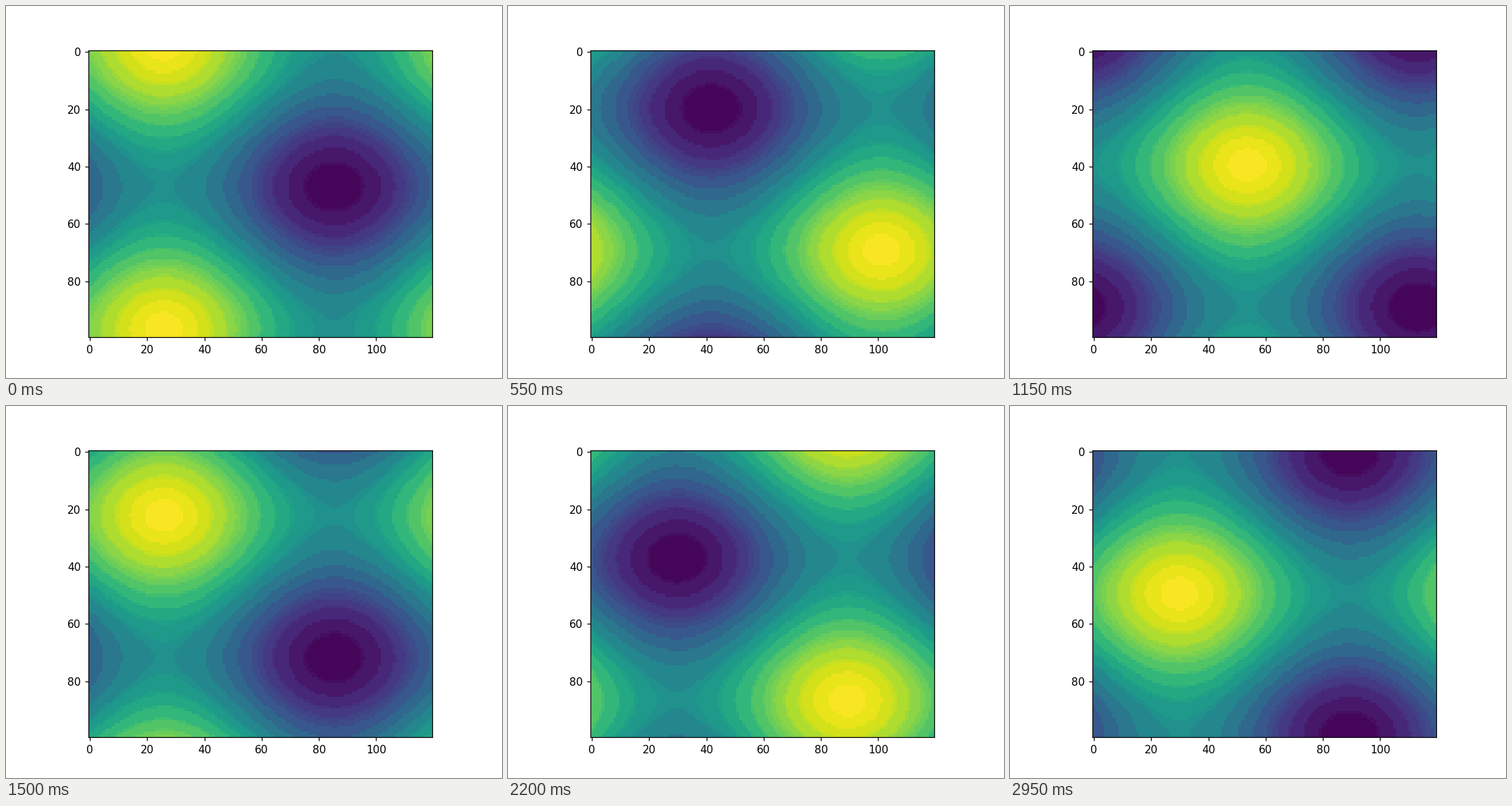
Recreate the animation shown at these times as a matplotlib script. Size 704 by 528 pixels, loop 3000 ms.

```python
import numpy as np
import matplotlib.pyplot as plt
from matplotlib.animation import FuncAnimation
from matplotlib.colors import ListedColormap

FRAMES, INTERVAL = 60, 50
CELL = (32, 16, 32)  # size of a colour cell in red, green and blue


def banded(name):
    """Flatten a colormap: colours sharing an RGB cell take their mean."""
    colors = plt.get_cmap(name)(np.arange(256))[:, :3]
    cells = np.round(colors * 255).astype(int) // CELL
    for cell in np.unique(cells, axis=0):
        same = (cells == cell).all(axis=1)
        colors[same] = colors[same].mean(axis=0)
    return ListedColormap(colors)


x = np.linspace(0, 2 * np.pi, 120)
y = np.linspace(0, 2 * np.pi, 100).reshape(-1, 1)


def wave(i):
    step = i + 1
    return np.sin(x + step * np.pi / 15) + np.cos(y + step * np.pi / 20)


fig, ax = plt.subplots(figsize=(6.4, 4.8), dpi=110)
im = ax.imshow(wave(0), cmap=banded("viridis"), interpolation="nearest")


def update(i):
    im.set_data(wave(i))
    im.autoscale()
    return [im]


anim = FuncAnimation(fig, update, frames=FRAMES, interval=INTERVAL,
                     repeat=True, repeat_delay=0, blit=False)
plt.show()
```
